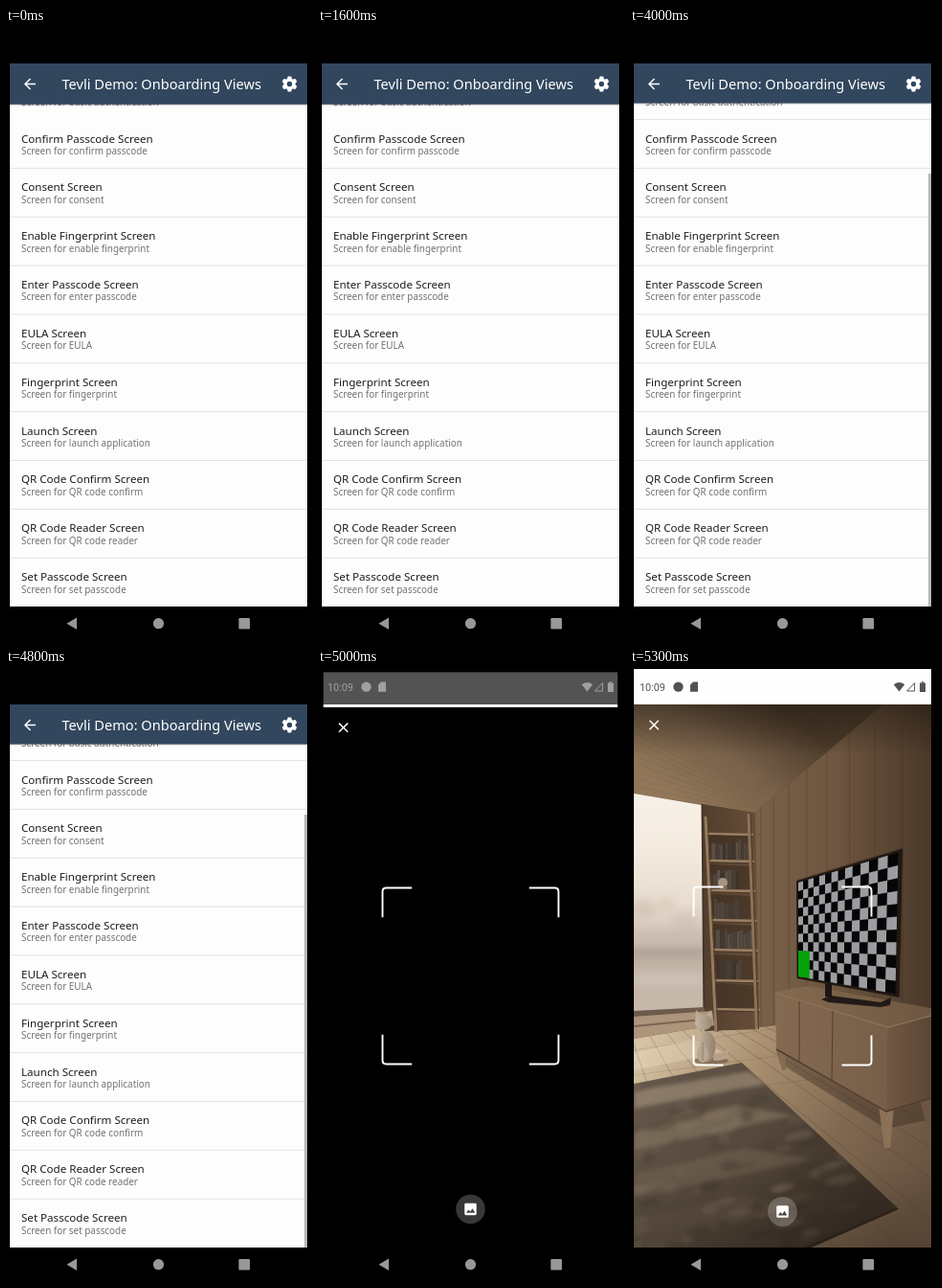
Animation of 320 by 640 pixels, one loop 8 s. Source, as an HTML page with a canvas:

```html
<!DOCTYPE html>
<html lang="en">
<head>
<meta charset="utf-8">
<title>Onboarding views</title>
<style>
html, body { margin: 0; width: 100%; height: 100%; overflow: hidden; background: #000; }
canvas { display: block; width: 320px; height: 640px; }
</style>
</head>
<body>
<canvas id="stage"></canvas>
<script>
const W = 320, H = 640, LOOP = 8000, STEP = 100;
const LEFT = 4, RIGHT = 315, BAR = 37, FOOT = 604;
const MID_X = 159.5, MID_Y = 319.5;
const PITCH = 50.85;
const SANS = '"Noto Sans", "Open Sans", sans-serif';
const dpr = window.devicePixelRatio || 1;

const ROWS = [
  ['Basic Auth Screen', 'basic authentication'],
  ['Confirm Passcode Screen', 'confirm passcode'],
  ['Consent Screen', 'consent'],
  ['Enable Fingerprint Screen', 'enable fingerprint'],
  ['Enter Passcode Screen', 'enter passcode'],
  ['EULA Screen', 'EULA'],
  ['Fingerprint Screen', 'fingerprint'],
  ['Launch Screen', 'launch application'],
  ['QR Code Confirm Screen', 'QR code confirm'],
  ['QR Code Reader Screen', 'QR code reader'],
  ['Set Passcode Screen', 'set passcode']
];

function setup(canvas) {
  canvas.width = W * dpr;
  canvas.height = H * dpr;
  const ctx = canvas.getContext('2d');
  ctx.scale(dpr, dpr);
  return ctx;
}

let g = setup(document.getElementById('stage'));

const clamp = v => Math.max(0, Math.min(1, v));
const mix = (a, b, f) => a + (b - a) * f;

function rect(x0, y0, x1, y1, fill) {
  g.fillStyle = fill;
  g.fillRect(x0, y0, x1 - x0, y1 - y0);
}

function path(pts, close) {
  g.beginPath();
  for (let i = 0; i < pts.length; i += 2) g.lineTo(pts[i], pts[i + 1]);
  if (close) g.closePath();
}

function poly(pts, fill) {
  path(pts, true);
  g.fillStyle = fill;
  g.fill();
}

function line(pts, color, width = 1) {
  path(pts);
  g.strokeStyle = color;
  g.lineWidth = width;
  g.stroke();
}

function oval(x, y, rx, ry, fill, turn = 0) {
  g.beginPath();
  g.ellipse(x, y, rx, ry, turn, 0, Math.PI * 2);
  g.fillStyle = fill;
  g.fill();
}

function fade(x0, y0, x1, y1, ...colors) {
  const grad = g.createLinearGradient(x0, y0, x1, y1);
  colors.forEach((c, i) => grad.addColorStop(i / (colors.length - 1), c));
  return grad;
}

function text(str, x, y, font, fill) {
  g.font = font;
  g.fillStyle = fill;
  g.fillText(str, x, y);
}

function scaled(s, draw) {
  g.save();
  g.translate(MID_X, MID_Y);
  g.scale(s, s);
  g.translate(-MID_X, -MID_Y);
  draw();
  g.restore();
}

function clipped(pts, draw) {
  g.save();
  path(pts, true);
  g.clip();
  draw();
  g.restore();
}

function random(seed) {
  return () => (seed = seed * 16807 % 2147483647) / 2147483647;
}

// ---- Room seen by the camera ----

function drawWalls() {
  rect(LEFT, BAR, RIGHT, FOOT, fade(120, 0, RIGHT, 0, '#7a624a', '#6d553f', '#4a3829'));
  for (let i = 0; i < 9; i++) {
    const x = 137 + i * 12 + i * i * 1.3;
    line([x, 60, x, 372], 'rgba(45,32,22,.22)');
  }
  const ceiling = [LEFT, BAR, 265, BAR, 130, 150, 75, 141, LEFT, 130];
  poly(ceiling, fade(150, BAR, 70, 148, '#4b3a2a', '#776049', '#917759'));
  clipped(ceiling, () => {
    for (let i = 0; i < 12; i++) {
      line([LEFT, 122 - i * 8, 128, 149 - i * 2, RIGHT, 45 - i * 12], 'rgba(50,36,24,.07)');
    }
  });
  line([130, 150, 265, BAR], 'rgba(45,32,22,.12)');
}

function drawWindow() {
  poly([75, 141, 131, 150, 135, 376, 78, 378], fade(75, 0, 135, 0, '#523e2d', '#664e39'));
  const pane = [LEFT, 130, 75, 142, 77, 356, LEFT, 362];
  poly(pane, fade(0, 130, 0, 360, '#f7f0e6', '#f4ebe0', '#e8dccf', '#c3b4a7', '#c6b8aa'));
  clipped(pane, () => {
    g.filter = 'blur(4px)';
    oval(14, 250, 14, 10, 'rgba(200,184,170,.5)');
    oval(38, 245, 9, 8, 'rgba(206,190,176,.45)');
    oval(58, 262, 13, 9, 'rgba(200,184,170,.45)');
    rect(0, 272, 80, 283, 'rgba(196,180,168,.5)');
    rect(0, 290, 80, 302, 'rgba(155,141,134,.5)');
    rect(0, 318, 80, 330, 'rgba(215,205,195,.5)');
    g.filter = 'none';
  });
  line([75.5, 141, 77.5, 360], '#443326', 2);
  poly([LEFT, 357, 78, 353, 78, 358, LEFT, 363], '#6d5b4b');
  poly([LEFT, 363, 86, 357, 88, 372, LEFT, 386], '#ac957b');
  line([LEFT, 373, 86, 365], '#7a6552', 2);
}

function drawFloor() {
  const floor = [LEFT, 386, 88, 372, 138, 374, 154, 372, RIGHT, 450, RIGHT, FOOT, LEFT, FOOT];
  poly(floor, fade(20, 380, 300, 560, '#d6c3a5', '#a98f70', '#806850', '#665240'));
  clipped(floor, () => {
    for (let i = 0; i < 10; i++) {
      line([-20 + i * 18, 374, 10 + i * 72, 620], 'rgba(70,52,36,.28)');
    }
    for (let i = 0; i < 3; i++) {
      line([LEFT, 398 + i * 26, 160 + i * 26, 374 + i * 26], 'rgba(80,60,42,.15)');
    }
    poly([LEFT, 401, 66, 386, 98, 400, LEFT, 419], 'rgba(240,228,205,.3)');
  });
}

function drawRug() {
  const rug = [LEFT, 433, 117, 411, 279, 562, 182, FOOT, LEFT, FOOT];
  poly([LEFT, 435, 117, 413, 281, 564, 190, FOOT, LEFT, FOOT], '#2e251d');
  poly(rug, fade(20, 425, 220, 590, '#64574a', '#54473b', '#382d24'));
  clipped(rug, () => {
    g.filter = 'blur(2px)';
    poly([LEFT, 441, 125, 420, 142, 433, LEFT, 459], 'rgba(180,162,136,.5)');
    poly([LEFT, 484, 110, 455, 172, 466, LEFT, 503], 'rgba(160,143,119,.4)');
    poly([LEFT, 528, 120, 500, 190, 512, LEFT, 552], 'rgba(130,114,94,.35)');
    poly([LEFT, 575, 120, 550, 170, 562, 30, FOOT, LEFT, FOOT], 'rgba(112,97,80,.28)');
    const rnd = random(71);
    for (let i = 0; i < 90; i++) {
      const light = rnd() > 0.5 ? '155,138,115' : '38,29,22';
      oval(rnd() * 250, 420 + rnd() * 185, 4 + rnd() * 13, 2 + rnd() * 4,
        `rgba(${light},${0.1 + rnd() * 0.16})`, -0.2);
    }
    g.filter = 'none';
  });
}

function drawShelf() {
  const rnd = random(29);
  const boards = [172, 200, 231, 262, 293, 325, 355];
  boards.forEach((y, i) => {
    const x0 = 79 + (y - 150) * 0.046, x1 = 125 + (y - 150) * 0.038;
    if (i) {
      poly([x0, y - 27, x1, y - 25, x1, y - 1, x0, y], 'rgba(52,38,28,.5)');
      let x = x0 + 4;
      const end = x1 - 4 - rnd() * 12;
      while (i < 6 && x < end) {
        const w = 2 + rnd() * 2.5, tone = 50 + rnd() * 32;
        rect(x, y - 16 - rnd() * 6, x + w, y - 1, `rgb(${tone + 10},${tone},${tone - 9})`);
        x += w + 0.4;
      }
    }
    line([x0, y, x1 + 3, y + 1], '#9a7f62', 2.6);
    line([x0, y + 2, x1 + 3, y + 3], '#4a3829');
  });
  line([79, 154, 90, 379], '#967b5e', 3);
  line([81, 154, 92, 379], '#554130');
  line([124, 151, 132.5, 376], '#8c7256', 3);
  line([126, 151, 134.5, 376], '#4c3a2b');
  oval(97, 223, 5, 5, '#a89580');
  rect(94, 226, 101, 230, '#85705c');
}

function drawCat() {
  oval(85, 409, 18, 3.5, 'rgba(60,42,28,.4)');
  g.beginPath();
  g.moveTo(87, 407);
  g.quadraticCurveTo(103, 409, 101, 398);
  g.strokeStyle = '#b5a48f';
  g.lineWidth = 3;
  g.stroke();
  oval(80, 394, 9.5, 16, fade(70, 0, 90, 0, '#c8b8a2', '#8f7d69'));
  oval(76, 402, 6, 9, '#b7a691');
  poly([68, 367, 69, 356, 74, 361, 80, 361, 85, 356, 86, 368], '#b9a995');
  oval(77, 369, 9, 8, fade(68, 0, 87, 0, '#c6b7a2', '#988671'));
  line([76, 390, 76, 409], 'rgba(85,67,50,.4)');
}

function drawCabinet() {
  poly([153, 398, 268, 463, RIGHT, 449, RIGHT, 470, 268, 480, 157, 412], 'rgba(40,29,21,.35)');
  poly([154, 396, 162, 398, 163, 419, 159, 419], '#866b51');
  poly([260, 456, 276, 458, 272, 500, 266, 500], '#8c7157');
  poly([303, 449, RIGHT, 447, RIGHT, 480, 311, 480], '#6c5541');
  poly([152, 337, 187, 331, RIGHT, 354, RIGHT, 363, 270, 374], fade(160, 0, RIGHT, 0, '#84694f', '#6e5742'));
  poly([152, 338, 270, 374, 268, 463, 153, 398], fade(152, 0, 270, 0, '#856a50', '#775e48'));
  poly([270, 374, RIGHT, 362, RIGHT, 449, 268, 463], fade(270, 0, RIGHT, 0, '#6f5742', '#5b4635'));
  line([152, 338, 270, 374, RIGHT, 362], '#937a5f');
  line([177, 347, 177, 411], '#513e2e');
  line([212, 357, 211, 430], '#513e2e');
  line([153, 397, 268, 462, RIGHT, 448], '#4f3c2d', 1.5);
}

function drawTv() {
  poly([200, 345, 210, 341, 262, 348, 273, 343, 272, 351, 262, 353, 208, 348], '#211a16');
  poly([204, 328, 211, 329, 211, 343, 204, 342], '#1c1714');
  poly([174, 221, 285.5, 187, 282, 343, 174.5, 323], '#211812');
  line([174, 221, 285.5, 187, 282, 343], '#49372a');

  // u and v run over the screen, seen in perspective
  const point = (u, v) => {
    const f = u * 98 / ((1 - u) * 148 + u * 98);
    const top = mix(223, 191.5, f), bottom = mix(321, 339, f);
    return [mix(176, mix(280.5, 277.5, v), f), mix(top, bottom, v)];
  };
  const patch = (u0, v0, u1, v1, fill) => poly([
    ...point(u0, v0), ...point(u1, v0), ...point(u1, v1), ...point(u0, v1)
  ], fill);
  const cols = 14, rows = 11;
  patch(0, 0, 1, 1, '#060606');
  for (let r = 0; r < rows; r++) {
    for (let c = r % 2; c < cols; c += 2) {
      patch(c / cols, r / rows, (c + 1) / cols, (r + 1) / rows, '#9c9da1');
    }
  }
  patch(0, 0.727, 0.165, 1, '#05a30a');
}

function makeRoom() {
  const canvas = document.createElement('canvas');
  const screen = g;
  g = setup(canvas);
  g.beginPath();
  g.rect(LEFT, BAR, RIGHT - LEFT, FOOT - BAR);
  g.clip();
  drawWalls();
  drawFloor();
  drawWindow();
  drawShelf();
  drawRug();
  drawCat();
  drawCabinet();
  drawTv();
  rect(LEFT, BAR, RIGHT, 90, fade(0, BAR, 0, 90, 'rgba(20,14,9,.45)', 'rgba(20,14,9,0)'));
  rect(LEFT, 520, RIGHT, FOOT, fade(0, 520, 0, FOOT, 'rgba(25,18,12,0)', 'rgba(25,18,12,.22)'));
  g = screen;
  return canvas;
}

// ---- App screens ----

function drawGear(x, y) {
  g.save();
  g.translate(x, y);
  for (let i = 0; i < 6; i++) {
    poly([-2.6, -5, -1.7, -8, 1.7, -8, 2.6, -5], '#fff');
    g.rotate(Math.PI / 3);
  }
  g.beginPath();
  g.arc(0, 0, 4.4, 0, Math.PI * 2);
  g.strokeStyle = '#fff';
  g.lineWidth = 3.4;
  g.stroke();
  g.restore();
}

function drawList(t) {
  const settle = clamp((t - 3400) / 600);
  const headEnd = mix(79.8, 78.6, settle);
  rect(LEFT, BAR, RIGHT, FOOT, '#fdfdfd');
  ROWS.forEach(([name, sub], i) => {
    const y = 119.5 + (i - 1) * PITCH;
    text(name, 16, y, '11.6px ' + SANS, '#1d1d1d');
    text('Screen for ' + sub, 16, y + 12.4, '9.9px ' + SANS, '#727272');
    if (i < ROWS.length - 1) {
      g.globalAlpha = i ? 1 : settle;
      rect(LEFT, y + 26.4, RIGHT, y + 27.4, '#e2e2e2');
      g.globalAlpha = 1;
    }
  });
  if (t >= 3400) rect(312, 152, RIGHT, FOOT, '#b9b9b9');
  rect(LEFT, BAR, RIGHT, headEnd, '#32475e');
  rect(LEFT, headEnd, RIGHT, headEnd + 2, fade(0, headEnd, 0, headEnd + 2, 'rgba(0,0,0,.2)', 'rgba(0,0,0,0)'));
  line([31, 58.5, 20, 58.5], '#fff', 1.5);
  line([25.5, 53, 20, 58.5, 25.5, 64], '#fff', 1.5);
  text('Tevli Demo: Onboarding Views', 58.5, 63.6, '14.6px ' + SANS, '#fff');
  drawGear(296.5, 58.5);
}

function drawCorner(sx, sy) {
  g.save();
  g.translate(MID_X, 320.5);
  g.scale(sx, sy);
  g.beginPath();
  g.moveTo(-93, -62);
  g.lineTo(-93, -89);
  g.quadraticCurveTo(-93, -93, -89, -93);
  g.lineTo(-62, -93);
  g.strokeStyle = '#fff';
  g.lineWidth = 1.9;
  g.stroke();
  g.restore();
}

function drawScanner(withRoom) {
  rect(LEFT, 0, RIGHT, BAR, '#fefefe');
  rect(LEFT, BAR, RIGHT, H, '#000');
  if (withRoom) g.drawImage(room, 0, 0, W, H);
  line([20.5, 53.8, 29.8, 63.1], '#fff', 1.5);
  line([29.8, 53.8, 20.5, 63.1], '#fff', 1.5);
  for (const sx of [1, -1]) for (const sy of [1, -1]) drawCorner(sx, sy);
  oval(159.5, 566.5, 15.4, 15.4, 'rgba(255,255,255,.22)');
  g.beginPath();
  g.roundRect(153.2, 560.2, 12.6, 12.6, 1.5);
  g.fillStyle = '#fff';
  g.fill();
  poly([154.8, 570.5, 157.4, 567, 159.2, 569.2, 161.6, 565.8, 164.3, 570.5], '#4d443c');
}

function drawStatus(t) {
  const shade = clamp((5312 - t) / 466);
  const tone = t < 5000 ? 250 : t < 5100 ? 160 : 82;
  const ink = `rgb(${tone},${tone},${tone})`;
  g.save();
  g.translate(0, t < 5000 ? -8 : 0);
  if (t < 5300) rect(LEFT, 0, RIGHT, BAR, `rgba(0,0,0,${shade})`);
  text('10:09', 10, 22.7, '10.8px Roboto, sans-serif', ink);
  oval(50.5, 18.6, 5.2, 5.2, ink);
  poly([66, 13.5, 71, 13.5, 71, 23.7, 63, 23.7, 63, 16.5], ink);
  g.beginPath();
  g.moveTo(281.5, 23.5);
  g.lineTo(275.8, 16.2);
  g.quadraticCurveTo(281.5, 11.8, 287.2, 16.2);
  g.fillStyle = ink;
  g.fill();
  path([289.6, 23, 297.6, 23, 297.6, 14.6], true);
  g.strokeStyle = ink;
  g.lineWidth = 1;
  g.stroke();
  rect(303, 14.5, 309, 24, ink);
  rect(304.7, 13.2, 307.3, 14.5, ink);
  g.restore();
}

function drawNav() {
  const gray = '#989898';
  poly([63.5, 621.7, 74, 615.4, 74, 628], gray);
  oval(159.5, 621.7, 5.6, 5.6, gray);
  g.beginPath();
  g.roundRect(243.4, 616, 11.6, 11.6, 1.2);
  g.fillStyle = gray;
  g.fill();
}

const room = makeRoom();

function frame(now) {
  const t = Math.floor(now % LOOP / STEP) * STEP;
  rect(0, 0, W, H, '#000');
  if (t < 4900) {
    drawList(t);
  } else {
    g.save();
    g.beginPath();
    g.rect(LEFT, 0, RIGHT - LEFT, H);
    g.clip();
    if (t < 5000) {
      scaled(1.043, () => drawList(t));
      rect(0, 0, W, H, 'rgba(0,0,0,.14)');
    }
    const left = clamp((5300 - t) / 400);
    scaled(1 - 0.025 * left ** 3, () => drawScanner(t >= 5100));
    g.restore();
    drawStatus(t);
  }
  drawNav();
}

const start = performance.now();
function tick() {
  frame(performance.now() - start);
  requestAnimationFrame(tick);
}
tick();
</script>
</body>
</html>
```
